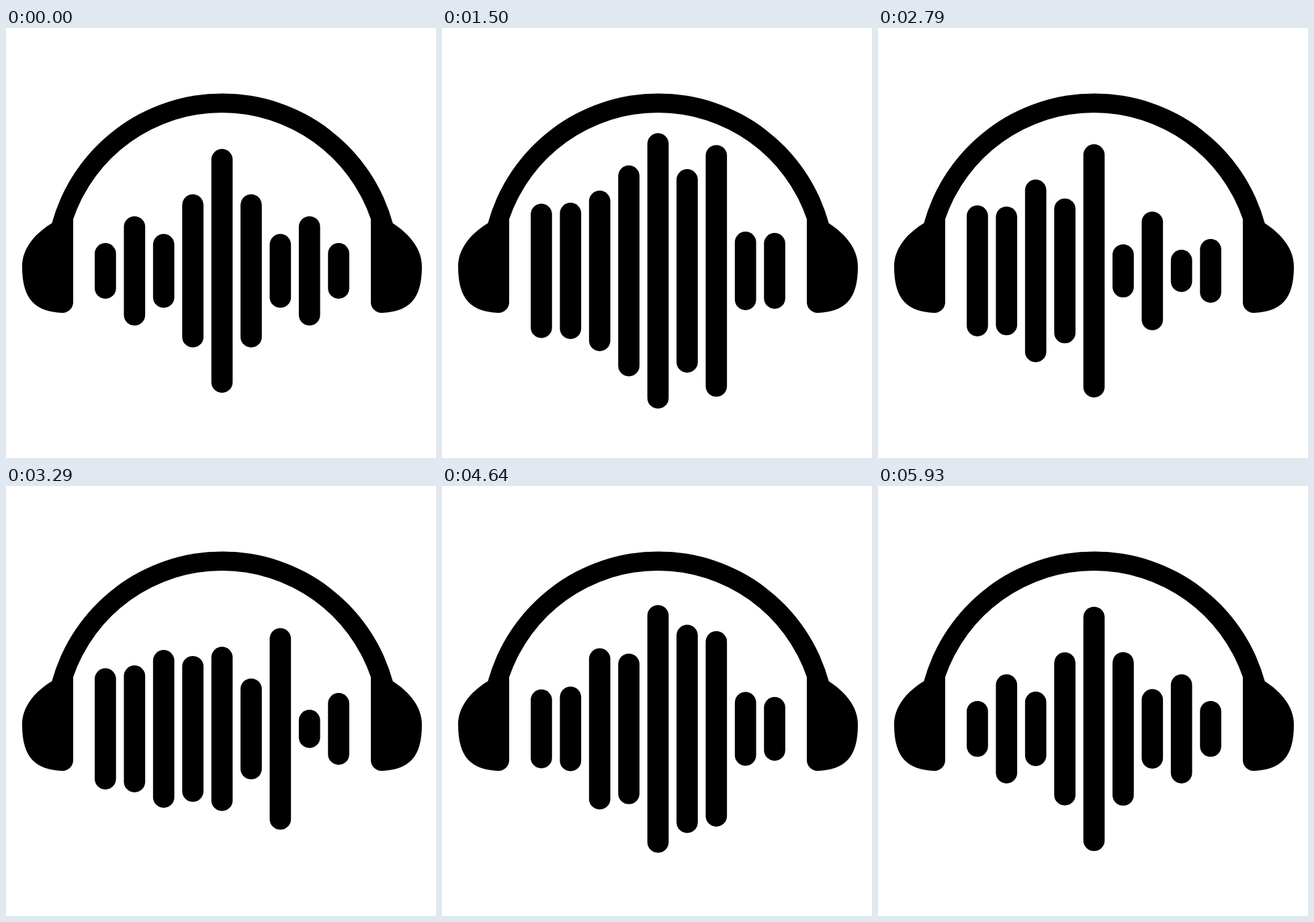
An HTML page that plays this animation: 640 px wide and 640 px high, repeating every 6 s.

```html
<!DOCTYPE html>
<html lang="en">
<head>
<meta charset="utf-8">
<title>Headphones equalizer</title>
<style>
  html, body { margin: 0; width: 100%; height: 100%; overflow: hidden; background: #fff; }
  svg { display: block; width: 100vw; height: 100vh; }
  #bars { stroke: #000; stroke-width: 31.7; stroke-linecap: round; }
</style>
</head>
<body>
<svg viewBox="0 0 640 640">
  <path d="M68.3 290.5C42 306.5 24 329 24 355C24 405 44 422 84 424A16 16 0 0 0 100 408V284.5
           A234 234 0 0 1 543 284.5V408A16 16 0 0 0 559 424C599 422 619 405 619 355
           C619 329 601 307 575.7 290.5A263.2 263.2 0 0 0 68.3 290.5Z"/>
  <g id="bars"></g>
</svg>
<script>
const LOOP = 6000, FPS = 14, END = LOOP / 1000 * FPS;
const CENTER_Y = 361.5, CENTER_X = 321.5, PITCH = 43.4, CAP = 15.85;

// Half heights at rest, from the middle bar outwards on both sides.
const REST = [181.5, 114, 55, 81.3, 41.5];

const swing = (high, low, turns) =>
  Object.fromEntries(turns.map((tick, i) => [tick, i % 2 ? low : high]));

// Per bar, the half height at a few turning ticks between two rests.
const KEYS = [
  { 12: 43, 21: 100, 32: 100 },
  { 12: 59.5, 21: 101.5, 46: 94.5, 65: 63 },
  { 12: 123, 21: 119.5, 32: 154.5, 46: 117.5, 65: 120 },
  { 12: 71.5, 21: 157, 32: 107.5 },
  swing(205, 64, [5, 12, 21, 32, 41, 50, 70]),
  { 12: 53, 21: 151.5, 32: 25.7, 65: 155 },
  { 22: 188, 32: 59.7, 55: 195, 65: 145.5, 75: 195 },
  { 46: 28.5 },
  { 21: 56.5, 32: 41.5, 46: 53.5 }
];

const ease = u => (1 - Math.cos(Math.PI * u)) / 2;

const bars = KEYS.map((keys, i) => {
  const offset = i - (KEYS.length - 1) / 2;
  const rest = REST[Math.abs(offset)];
  const line = document.createElementNS("http://www.w3.org/2000/svg", "line");
  line.setAttribute("x1", CENTER_X + offset * PITCH);
  line.setAttribute("x2", CENTER_X + offset * PITCH);
  document.getElementById("bars").append(line);
  return { line, path: Object.entries({ 0: rest, ...keys, [END]: rest }) };
});

function levelAt(path, tick) {
  const next = path.findIndex(([at]) => at > tick);
  const [from, a] = path[next - 1], [to, b] = path[next];
  return a + (b - a) * ease((tick - from) / (to - from));
}

function render(ms) {
  const tick = Math.floor((ms % LOOP + 4) * FPS / 1000) % END;
  for (const { line, path } of bars) {
    const reach = levelAt(path, tick) - CAP;
    line.setAttribute("y1", CENTER_Y - reach);
    line.setAttribute("y2", CENTER_Y + reach);
  }
}

const start = performance.now();
function loop() {
  render(performance.now() - start);
  requestAnimationFrame(loop);
}
loop();
</script>
</body>
</html>
```
